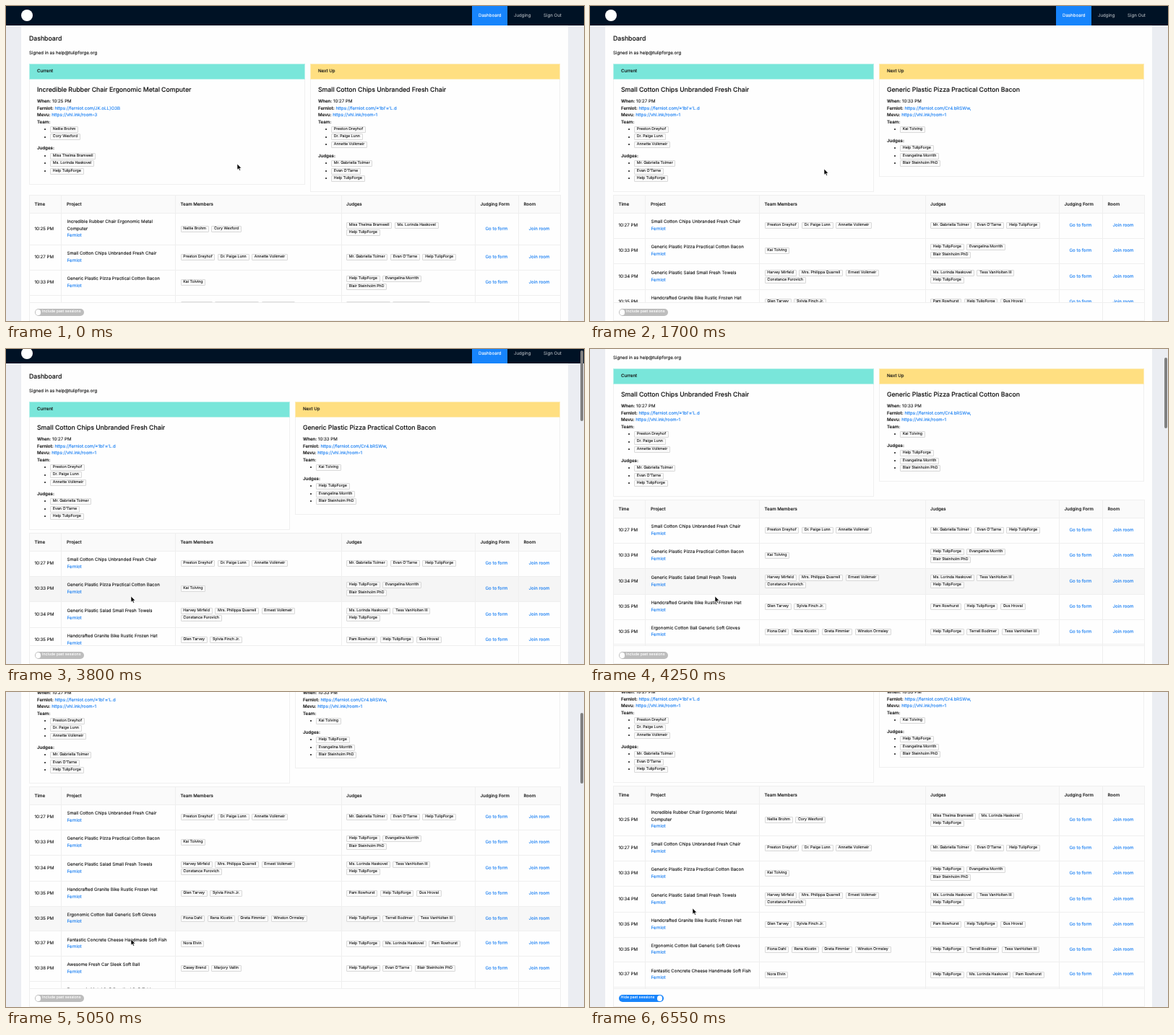
Recreate the animation shown at these times as an HTML page. Size 800 by 437 pixels, loop 6.6 s.

```html
<!DOCTYPE html>
<html lang="en">
<head>
<meta charset="utf-8">
<title>Dashboard</title>
<style>
html, body { margin: 0; width: 100%; height: 100%; overflow: hidden; background: #ebedf2; }
body { position: relative; font: 6.125px/10px Inter, sans-serif; color: #141414; text-rendering: geometricPrecision; -webkit-text-stroke: .1px; }
div, p, svg { position: absolute; margin: 0; box-sizing: border-box; white-space: nowrap; }
#paper { left: 21px; width: 757px; height: 437px; background: #fefefe; }
#view { width: 800px; height: 411px; overflow: hidden; }
#page { width: 800px; height: 1000px; }
.nav { width: 800px; height: 27px; background: #001225; }
.logo { left: 21px; top: 5px; width: 16px; height: 16px; border-radius: 50%; background: #fff; }
.tab { left: 645px; width: 49px; height: 27px; background: #1784fb; }
.dim { color: #a6adb4; }
.white { color: #fff; }
.title { font-size: 8.75px; font-weight: 500; letter-spacing: -.04px; }
.head { font-weight: 500; }
b { font-weight: 600; }
a { color: #147cf2; }
.card { top: 80px; border: 1px solid #f0f0f0; }
.bar { box-shadow: inset 0 0 0 1px rgba(250, 250, 250, .45); }
.chips { display: flex; gap: 3.5px; height: 10px; }
.chips span { height: 9px; box-sizing: border-box; padding: 0 2.8px; border: 1px solid #d9d9d9; border-radius: 1px; background: #fafafa; font-size: 5.25px; line-height: 7px; }
.dot { width: 2px; height: 2px; border-radius: 50%; background: #141414; }
.row { border-bottom: 1px solid #efefef; }
#foot { left: 32px; top: 411px; width: 736px; height: 26px; border: 1px solid #efefef; background: #fefefe; }
#foot div { left: 676px; width: 1px; height: 24px; background: #efefef; }
#switch { left: 39.5px; top: 420px; height: 9.6px; border-radius: 5px; color: #fff; font-size: 5.25px; line-height: 9.6px; }
#knob { top: 1px; width: 7.6px; height: 7.6px; border-radius: 50%; background: #fff; }
#thumb { left: 795px; width: 4px; height: 98px; border-radius: 2px; background: #808080; }
#cursor { width: 8px; height: 11px; overflow: visible; }
</style>
</head>
<body>
<div id="paper"></div>
<div id="view"><div id="page"></div></div>
<div id="foot"><div></div></div>
<div id="switch"><p id="label"></p><div id="knob"></div></div>
<div id="thumb"></div>
<svg id="cursor"><path d="M0 0V8.2L1.9 6.5 3.1 9.3 4.5 8.7 3.3 6H5.8Z" stroke="#fff" stroke-width=".6"/></svg>
<script>
const LOOP = 6600, ADVANCE = 1000, TOGGLE = 6050, TABLE_TOP = 287;
// While the page scrolls, the hovered row is only looked up now and then.
const HOVER_TICK = 400, HOVER_PHASE = 80, HOVER_FADE = 200;
const $ = id => document.getElementById(id);
const host = 'Help TulipForge';

// time, project, team, judges, link, room ("|" starts a new line of tags)
const sessions = [
  ['10:25', 'Incredible Rubber Chair Ergonomic Metal<br>Computer', 'Nellie Brohm,Cory Wexford',
    `Miss Thelma Bramwell,Ms. Lorinda Haskovel|${host}`, 'JK.oLL}O3B', 3],
  ['10:27', 'Small Cotton Chips Unbranded Fresh Chair', 'Preston Dreyhof,Dr. Paige Lunn,Annette Volkmeir',
    `Mr. Gabriella Tolmer,Evan O'Tarne,${host}`, "=1bl'='L.d", 1],
  ['10:33', 'Generic Plastic Pizza Practical Cotton Bacon', 'Kai Tolving',
    `${host},Evangelina Morrith|Blair Steinholm PhD`, 'Cr4.bRSWw,', 1],
  ['10:34', 'Generic Plastic Salad Small Fresh Towels', 'Harvey Mirfeld,Mrs. Philippa Quarrell,Ernest Volkmeir|Constance Furovich',
    `Ms. Lorinda Haskovel,Tess VanHolten III|${host}`],
  ['10:35', 'Handcrafted Granite Bike Rustic Frozen Hat', 'Glen Tarvey,Sylvia Finch Jr.',
    `Pam Rowhurst,${host},Gus Hroval`],
  ['10:35', 'Ergonomic Cotton Ball Generic Soft Gloves', 'Fiona Dahl,Rena Klostin,Greta Fimmler,Winston Ormsley',
    `${host},Terrell Bodimer,Tess VanHolten III`],
  ['10:37', 'Fantastic Concrete Cheese Handmade Soft Fish', 'Nora Elvin',
    `${host},Ms. Lorinda Haskovel,Pam Rowhurst`],
  ['10:38', 'Awesome Fresh Car Sleek Soft Ball', 'Casey Brend,Marjory Vallin',
    `${host},Evan O'Tarne,Blair Steinholm PhD`],
  ['10:38', 'Ergonomic Metal Soft Practical Soft Table', '', ''],
];

// Text and tags are placed by left edge and vertical centre, on whole pixels.
const text = (x, y, html, cls = '') =>
  `<p class="${cls}" style="left:${x}px;top:${Math.round(y - 4.5)}px">${html}</p>`;
const box = (cls, x, y, w, h, bg) =>
  `<div class="${cls}" style="left:${x}px;top:${y}px;width:${w}px;height:${h}px;background:${bg}"></div>`;
const tags = (x, y, names) => names
  ? `<div class="chips" style="left:${x}px;top:${Math.round(y - 4.2)}px">${names.split(',').map(n => `<span>${n}</span>`).join('')}</div>` : '';
const tagLines = (x, y, list) => {
  const lines = list.split('|');
  return lines.map((l, i) => tags(x, y + (i - (lines.length - 1) / 2) * 10.6, l)).join('');
};

function card(x, w, head, color, [time, name, team, judges, link, room]) {
  const left = x + 11;
  let y = 161, html = '';
  const people = list => {
    y += 10;
    for (const n of list.split(/[,|]/)) {
      html += `<div class="dot" style="left:${x + 21}px;top:${y - 1}px"></div>` + tags(x + 29, y, n);
      y += 10.5;
    }
  };
  people(team);
  y += 5.8;
  html += text(left, y, '<b>Judges:</b>');
  people(judges);
  return `<div class="card" style="left:${x}px;width:${w}px;height:${Math.round(y + 8.5) - 80}px"></div>`
    + box('bar', x, 80, w, 22, color) + text(left, 90.5, head, 'head')
    + text(left, 116, name.replace('<br>', ' '), 'title')
    + text(left, 132.5, `<b>When:</b> ${time} PM`)
    + text(left, 142, `<b>Fernlot:</b> <a>https://fernlot.com/${link}</a>`)
    + text(left, 151.8, `<b>Mevu:</b> <a>https://vhl.ink/room-${room}</a>`)
    + text(left, 161, '<b>Team:</b>') + html;
}

const rowHeight = ([, name, team, judges]) =>
  name.includes('<br>') ? 44 : (team + judges).includes('|') ? 35.7 : 34.7;

function table(rows, hovered) {
  const columns = [[39.5, 'Time'], [84, 'Project'], [241.5, 'Team Members'], [471, 'Judges'], [656.5, 'Judging Form'], [716.5, 'Room']];
  let html = box('row', 32, 262, 736, 26, '#fafafa') + box('', 32, 262, 736, 1, '#efefef')
    + columns.map(([x, t]) => text(x, 275, t, 'head')).join('');
  let y = TABLE_TOP;
  rows.forEach((r, i) => {
    const h = rowHeight(r), mid = y + h / 2, names = r[1].split('<br>');
    html += box('row', 32, y + 1, 736, h, i === hovered ? 'rgba(0,0,0,var(--shade))' : 'none')
      + text(39.5, mid, r[0] + ' PM')
      + [...names, '<a>Fernlot</a>'].map((n, k) => text(84.5, mid + (k - names.length / 2) * 9.6, n)).join('')
      + tagLines(241.5, mid, r[2]) + tagLines(471, mid, r[3])
      + text(663.5, mid, '<a>Go to form</a>') + text(723.5, mid, '<a>Join room</a>');
    y += h;
  });
  return html + [32, 76, 234, 464, 649, 709, 767].map(x => box('', x, 262, 1, 700, '#efefef')).join('');
}

function page(now, first, hovered) {
  const split = now ? 393 : 414;
  return '<div class="nav"></div><div class="logo"></div><div class="tab"></div>'
    + text(654, 13.5, 'Dashboard', 'white') + text(703, 13.5, 'Judging', 'dim') + text(744, 13.5, 'Sign Out', 'dim')
    + text(32, 45, 'Dashboard', 'title') + text(32, 65.5, 'Signed in as help@tulipforge.org')
    + card(32, split - 32, 'Current', '#79e6da', sessions[now])
    + card(split + 7, 760 - split, 'Next Up', '#ffdf81', sessions[now + 1])
    + table(sessions.slice(first), hovered);
}

// Interpolates keys of the form [time, ...values].
function track(keys, t, ease = u => u) {
  const i = keys.findIndex(k => k[0] > t);
  if (i < 0) return keys.at(-1).slice(1);
  if (!i) return keys[0].slice(1);
  const [a, b] = [keys[i - 1], keys[i]], u = ease((t - a[0]) / (b[0] - a[0]));
  return a.slice(1).map((v, k) => v + (b[k + 1] - v) * u);
}
const smooth = u => u * u * (3 - 2 * u);
const scrollAt = t => track([[3735, 0], [3800, 6.7], [4250, 53], [4600, 89.5], [4950, 125], [5050, 131], [5200, 132]], t)[0];
const cursorAt = t => track([[800, 320, 219], [1400, 324, 226], [2600, 324, 226], [3450, 173, 343],
  [5250, 173, 343], [5600, 72, 421], [5750, 70, 424], [6380, 70, 424], [6550, 142, 300]], t, smooth);

function hoveredRow(t, rows) {
  const y = cursorAt(t)[1];
  let rest = y + scrollAt(t) - TABLE_TOP;
  if (rest < 0 || y > 411) return -1;
  return rows.findIndex(r => (rest -= rowHeight(r)) < 0);
}

let drawn;
function frame(ms) {
  const t = ms % LOOP, now = t < ADVANCE ? 0 : 1, past = t >= TOGGLE;
  const first = past ? 0 : now, rows = sessions.slice(first);
  const tick = Math.floor((t - HOVER_PHASE) / HOVER_TICK) * HOVER_TICK + HOVER_PHASE;
  const hovered = hoveredRow(tick, rows), stays = hovered === hoveredRow(tick - HOVER_TICK, rows);
  const fade = stays ? 1 : Math.min(1, (t - tick) / HOVER_FADE) ** 2;
  const key = [now, first, hovered].join();
  if (key !== drawn) {
    drawn = key;
    $('page').innerHTML = page(now, first, hovered);
  }
  const scroll = scrollAt(t), [x, y] = cursorAt(t);
  $('page').style.top = -Math.round(scroll) + 'px';
  $('page').style.setProperty('--shade', fade * .035);
  $('thumb').style.top = 1 + scroll * .215 + 'px';
  $('thumb').style.opacity = track([[3700, 0], [3750, 1], [5600, 1], [5800, 0]], t)[0];
  $('cursor').style.transform = `translate(${x}px,${y}px)`;
  $('switch').style.width = past ? '62px' : '68.5px';
  $('switch').style.background = past ? '#1784fb' : '#bdbdbd';
  $('label').textContent = past ? 'Hide past sessions' : 'Include past sessions';
  $('label').style.left = past ? '3px' : '10.5px';
  $('knob').style.left = past ? '53.4px' : '1px';
  requestAnimationFrame(() => frame(performance.now() - start));
}
const start = performance.now();
frame(0);
</script>
</body>
</html>
```
